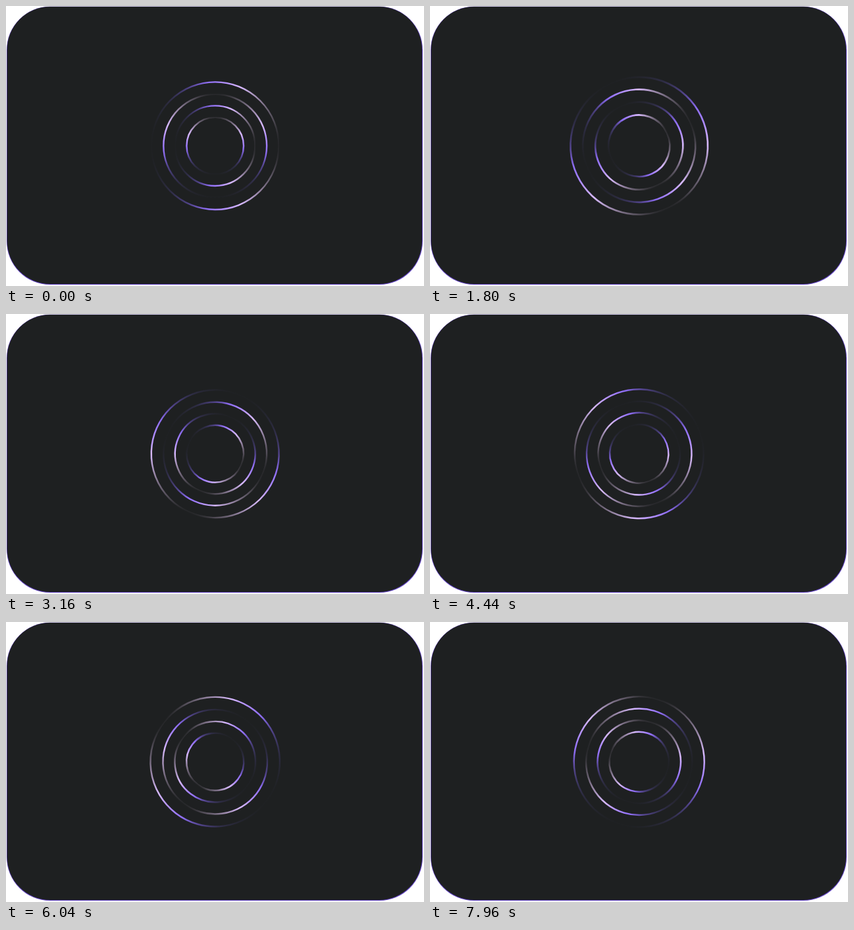
Write an HTML page with a canvas that moves like this. It is 635x425 px and loops after 8 s.

```html
<!DOCTYPE html>
<html lang="en">
<head>
<meta charset="utf-8">
<title>Pulsing rings</title>
<style>
html, body { margin: 0; width: 100%; height: 100%; overflow: hidden; background: #fff; }
canvas { display: block; width: 635px; height: 425px; }
</style>
</head>
<body>
<canvas id="stage"></canvas>
<script>
const W = 635, H = 425;
const LOOP = 8000, TURN = 10000, PULSE = TURN / 3;
const CENTER = { x: 317.7, y: 212.2 };
const SWELL = 0.1, STAGGER = 90, LINE = 2.4;

// Outermost first; start is the gradient direction in degrees.
const RINGS = [
  { radius: 96.8, start: 0 },
  { radius: 78.4, start: -90 },
  { radius: 60.8, start: 0 },
  { radius: 43.3, start: -90 }
];

// Position along the gradient, colour, opacity.
const STOPS = [
  [0, '100,92,180', 0],
  [0.15, '108,92,205', 0.2],
  [0.3, '128,100,235', 0.52],
  [0.43, '146,112,250', 0.95],
  [0.5, '158,124,255', 1],
  [0.6, '186,152,255', 1],
  [0.7, '216,186,255', 1],
  [0.85, '220,192,240', 0.6],
  [0.95, '214,190,226', 0.28],
  [1, '200,180,210', 0]
];

const canvas = document.getElementById('stage');
const ctx = canvas.getContext('2d');
const ratio = window.devicePixelRatio || 1;
canvas.width = W * ratio;
canvas.height = H * ratio;

function fillCard(x, y, right, bottom, radius, color) {
  ctx.beginPath();
  ctx.roundRect(x, y, right - x, bottom - y, radius);
  ctx.fillStyle = color;
  ctx.fill();
}

// Sharp swell: cubic rise to the middle of the period, mirrored fall.
function pulse(t) {
  const phase = (((t / PULSE) % 1) + 1) % 1;
  return (1 - Math.abs(2 * phase - 1)) ** 3;
}

function sweep(radius) {
  const gradient = ctx.createLinearGradient(-radius, 0, radius, 0);
  for (const [at, rgb, alpha] of STOPS) {
    gradient.addColorStop(at, `rgba(${rgb},${alpha})`);
  }
  return gradient;
}

function drawRing({ radius, start }, index, t) {
  const delay = (RINGS.length - 1 - index) * STAGGER;
  const scale = 1 + SWELL * pulse(t - delay);
  ctx.save();
  ctx.translate(CENTER.x, CENTER.y);
  ctx.rotate(start * Math.PI / 180 + t / TURN * 2 * Math.PI);
  ctx.scale(scale, scale);
  ctx.beginPath();
  ctx.arc(0, 0, radius, 0, 2 * Math.PI);
  ctx.lineWidth = LINE;
  ctx.strokeStyle = sweep(radius + LINE / 2);
  ctx.stroke();
  ctx.restore();
}

function draw(t) {
  ctx.setTransform(ratio, 0, 0, ratio, 0, 0);
  ctx.fillStyle = '#fff';
  ctx.fillRect(0, 0, W, H);
  fillCard(1, 0.8, 633, 423, 66, '#6546c8');
  fillCard(1.6, 1.1, 632.1, 422, 65.4, '#1e2021');
  RINGS.forEach((ring, i) => drawRing(ring, i, t));
}

const begin = performance.now();
function tick() {
  draw((performance.now() - begin) % LOOP);
  requestAnimationFrame(tick);
}
tick();
</script>
</body>
</html>
```
